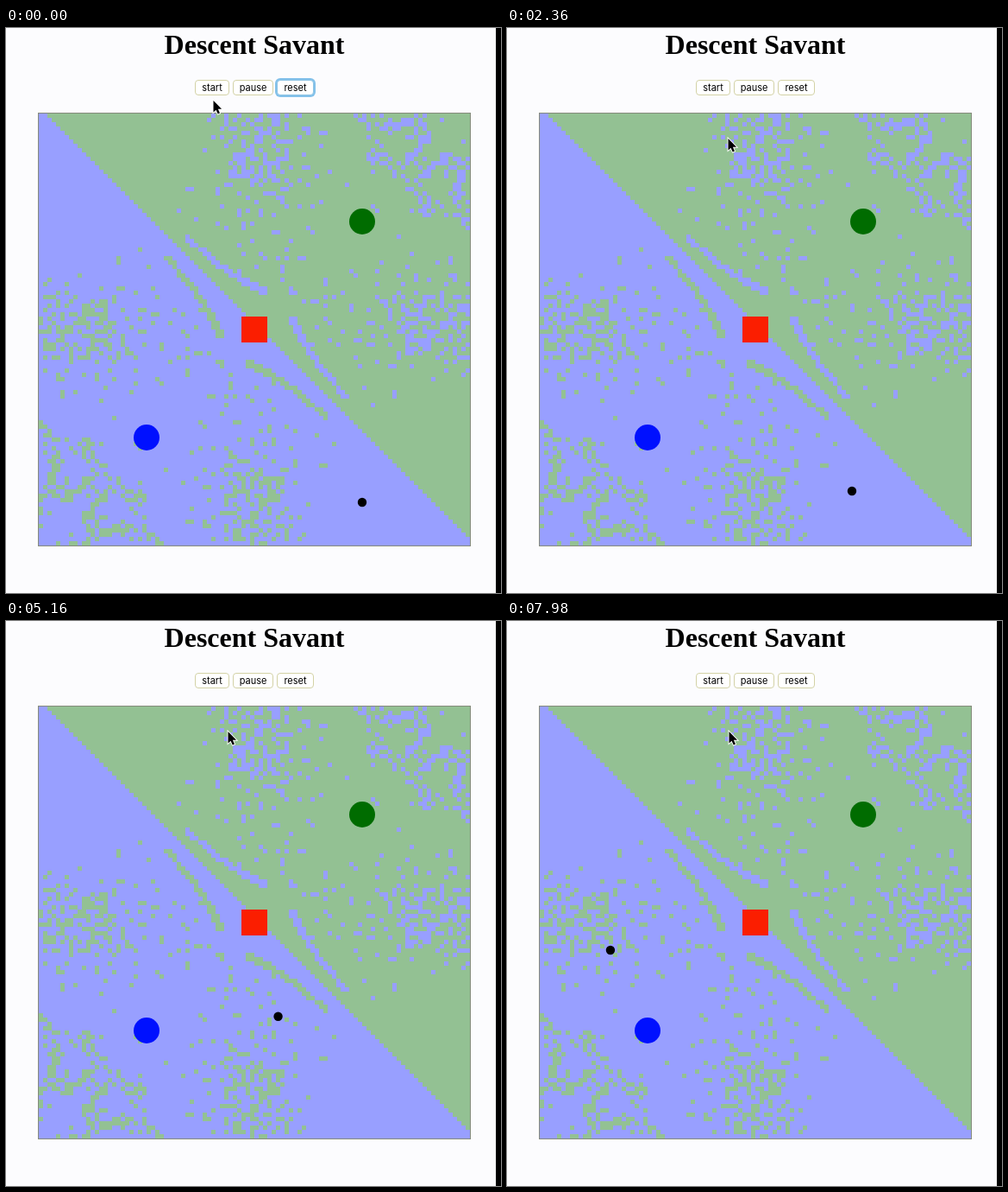
Recreate the animation shown at these times as an HTML page with a canvas. Size 574 by 654 pixels, loop 8000 ms.

```html
<!DOCTYPE html>
<html lang="en">
<head>
<meta charset="utf-8">
<title>Descent Savant</title>
<style>
  html, body { margin: 0; width: 574px; height: 654px; overflow: hidden; background: #fcfcfe; }
  body { position: relative; }
  h1 {
    position: absolute; left: 0; top: 1px; width: 576px; margin: 0;
    font: bold 32px/37px "Liberation Serif", serif; text-align: center; color: #000;
  }
  .btn {
    position: absolute; top: 60px; height: 18px; box-sizing: border-box;
    border: 1px solid #d3d2a6; border-radius: 4px; background: #fff;
    font: 11px/16px Inter, sans-serif; text-align: center; color: #000;
  }
  .focus { border-color: #8cc3e4; box-shadow: 0 0 0 2px #83c1ea; }
  canvas { position: absolute; left: 0; top: 0; }
</style>
</head>
<body>
<h1>Descent Savant</h1>
<div class="btn" style="left:219px;width:40px">start</div>
<div class="btn" style="left:263px;width:47px">pause</div>
<div class="btn" id="reset" style="left:314px;width:43px">reset</div>
<canvas id="stage" width="574" height="654"></canvas>
<script>
const W = 574, H = 654, LOOP = 8000, CLICK = 1040;
const LEFT = 38, TOP = 99, CELL = 5, N = 100;
const BLUE = '#989fff', GREEN = '#93c193';
const ctx = document.getElementById('stage').getContext('2d');
const reset = document.getElementById('reset');

// time, x, y, vx, vy (px per ms)
const ballKeys = [
  [CLICK, 413, 549, 0, 0],
  [2360, 400, 536, -.019, -.0195],
  [4360, 347, 485, -.034, -.031],
  [5760, 286, 434, -.054, -.042],
  [6600, 229, 398, -.080, -.036],
  [LOOP - 20, 120, 381, -.080, .011]
];
const cursorKeys = [
  [0, 240.5, 84, 0, 0],
  [640, 241.5, 68, 0, 0],
  [1160, 241.5, 68, 0, 0],
  [1900, 256.5, 128, 0, 0],
  [2400, 256.5, 128, 0, 0],
  [2800, 257.5, 128, 0, 0]
];

// Cubic Hermite path through timed points with velocities.
function along(keys, t) {
  const last = keys[keys.length - 1];
  if (t <= keys[0][0]) return keys[0].slice(1, 3);
  if (t >= last[0]) return [1, 2].map(i => last[i] + last[i + 2] * (t - last[0]));
  const k = keys.findIndex(p => p[0] > t);
  const a = keys[k - 1], b = keys[k], d = b[0] - a[0];
  const u = (t - a[0]) / d, u2 = u * u, u3 = u2 * u;
  return [1, 2].map(i =>
    (2 * u3 - 3 * u2 + 1) * a[i] + (3 * u2 - 2 * u3) * b[i] +
    d * ((u3 - 2 * u2 + u) * a[i + 2] + (u3 - u2) * b[i + 2]));
}

function hash(c, r) {
  let h = Math.imul(c + 11, 374761393) ^ Math.imul(r + 7, 668265263);
  h = Math.imul(h ^ (h >>> 13), 1274126177);
  h = Math.imul(h ^ (h >>> 15), 2246822519);
  return ((h ^ (h >>> 16)) >>> 0) / 4294967296;
}

const hill = (c, r, cx, cy, sx, sy) =>
  Math.exp(-(((c - cx) / sx) ** 2 + ((r - cy) / sy) ** 2));

// Distance from the centre of the tilted oval in the corner.
function ovalDistance(c, r) {
  const x = c - 7.5, y = r - 82;
  return Math.hypot((x - y) / 1.8, (x + y) / 1.41);
}

// Chance that a cell in the basic quarter falls to the far planet.
function chance(c, r) {
  return Math.max(
    .54 * hill(c, r, 9, 50, 13, 9),
    .13 * hill(c, r, 31, 55, 10, 7),
    .09 * hill(c, r, 9, 63, 9, 5),
    .62 * Math.exp(-(((ovalDistance(c, r) - 4.8) / 1.6) ** 2)),
    .35 * hill(c, r, 3, 75, 4, 3),
    .35 * hill(c, r, 0, 89, 2, 4),
    .05 * hill(c, r, 17, 79, 5, 5));
}

function stray(c, r) {
  const s = r - 33;
  if (s >= 0 && s <= 18 && Math.abs(c - 29.2 - .97 * s + .0155 * s * s) < .85) return true;
  return hash(c, r) < chance(c, r);
}

// Folds the field over both diagonals onto one quarter.
function isGreen(c, r) {
  const upper = c - r > 1;
  if (upper) [c, r] = [r + 1, c - 1];
  if (c + r > N - 1) [c, r] = [N - 1 - r, N - 1 - c];
  return upper !== stray(c, r);
}

function disc(g, x, y, radius, color) {
  g.fillStyle = color;
  g.beginPath();
  g.arc(x, y, radius, 0, Math.PI * 2);
  g.fill();
}

function makeField() {
  const layer = document.createElement('canvas');
  layer.width = W;
  layer.height = H;
  const g = layer.getContext('2d');
  const box = (x, y, w, h, color) => { g.fillStyle = color; g.fillRect(x, y, w, h); };
  box(LEFT - 1, TOP - 1, N * CELL + 2, N * CELL + 2, '#858b7c');
  box(LEFT, TOP, N * CELL, N * CELL, BLUE);
  for (let r = 0; r < N; r++)
    for (let c = 0; c < N; c++)
      if (isGreen(c, r)) box(LEFT + c * CELL, TOP + r * CELL, CELL, CELL, GREEN);
  box(273, 334, 30, 30, '#fb1e00');
  disc(g, 413, 224, 15, '#006c00');
  disc(g, 163, 474, 15, '#0010ff');
  box(568, 0, 6, H, '#000');
  return layer;
}

const arrow = new Path2D('M0 0V14.5L3.3 11.5L5.6 16.8L8 15.7L5.8 10.6H10.3Z');

function drawCursor([x, y]) {
  ctx.save();
  ctx.translate(x, y);
  ctx.scale(.93, .93);
  ctx.strokeStyle = '#fff';
  ctx.lineWidth = 2;
  ctx.stroke(arrow);
  ctx.fillStyle = '#000';
  ctx.fill(arrow);
  ctx.restore();
}

const field = makeField();

function frame() {
  const t = performance.now() % LOOP;
  ctx.clearRect(0, 0, W, H);
  ctx.drawImage(field, 0, 0);
  disc(ctx, ...along(ballKeys, t), 5.2, '#000');
  drawCursor(along(cursorKeys, t));
  reset.className = t < CLICK ? 'btn focus' : 'btn';
  requestAnimationFrame(frame);
}
frame();
</script>
</body>
</html>
```
